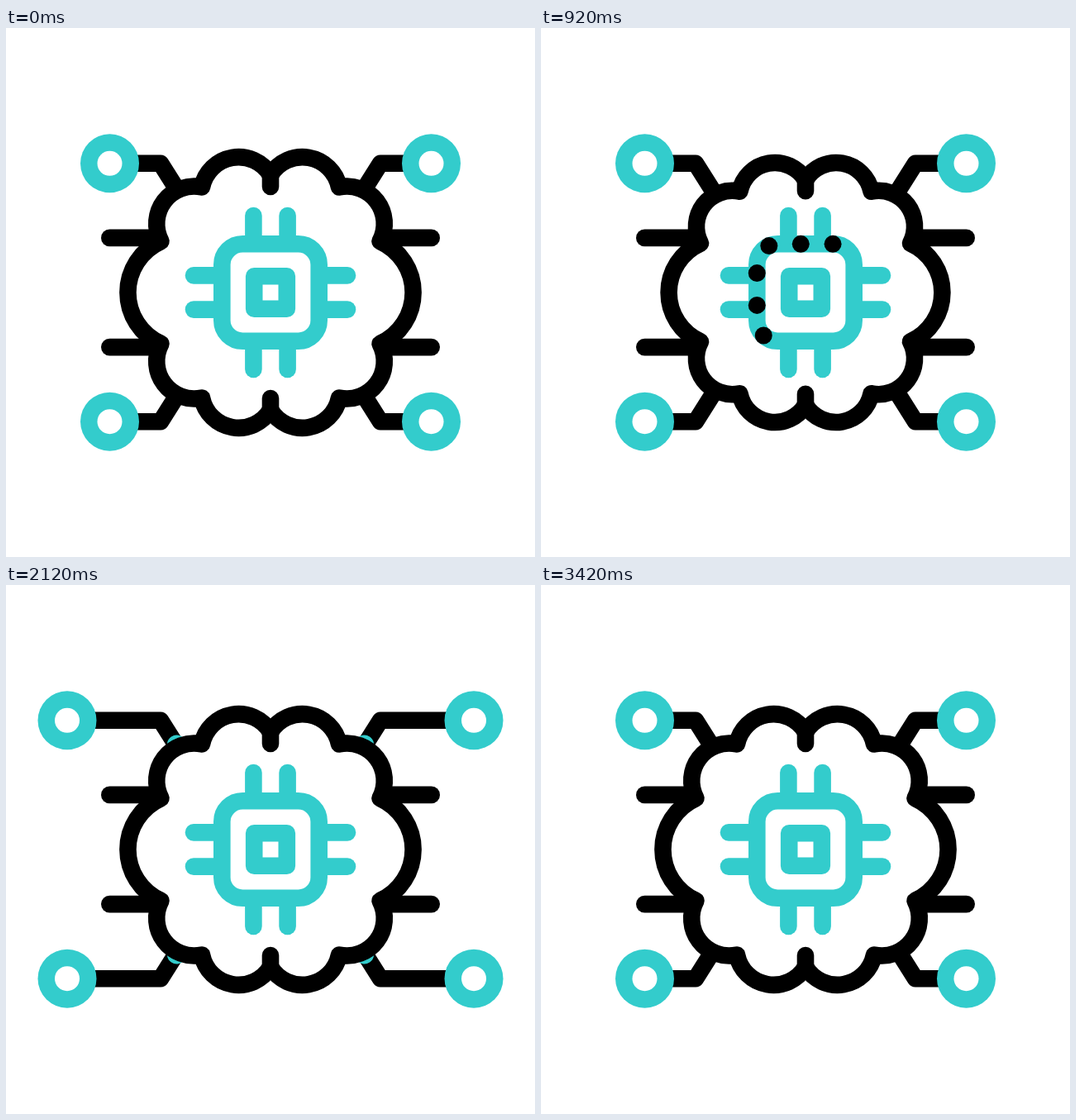
Animation, 640 px wide and 640 px high, one loop 3600 ms. Source, as an HTML page with a canvas:

```html
<!DOCTYPE html>
<html lang="en">
<head>
<meta charset="utf-8">
<title>Brain chip</title>
<style>
html, body { margin: 0; width: 100%; height: 100%; overflow: hidden; background: #fff; }
canvas { display: block; width: 640px; height: 640px; }
</style>
</head>
<body>
<canvas id="stage" width="640" height="640"></canvas>
<script>
const ctx = document.getElementById('stage').getContext('2d');
const LOOP = 3600, W = 20.6;
const BLACK = '#000', CYAN = '#33cccc', WHITE = '#fff';
const SIDES = [-1, 1];

// All coordinates are relative to the centre of the stage.
const brain = new Path2D(
  'M0 -142 A45.2 45.2 0 0 0 -83 -127.5 A45.3 45.3 0 0 0 -132.5 -62' +
  'A68 68 0 0 0 -132.5 62 A45.3 45.3 0 0 0 -83 127.5 A45.2 45.2 0 0 0 0 142' +
  'A45.2 45.2 0 0 0 83 127.5 A45.3 45.3 0 0 0 132.5 62' +
  'A68 68 0 0 0 132.5 -62 A45.3 45.3 0 0 0 83 -127.5 A45.2 45.2 0 0 0 0 -142Z');
const stems = new Path2D('M0 -142V-128M0 142V128');

// Eased progress from time a to time b.
function ease(t, a, b) {
  const u = Math.min(1, Math.max(0, (t - a) / (b - a)));
  return u * u * (3 - 2 * u);
}

function line(points, color, width = W) {
  ctx.beginPath();
  points.forEach(([x, y]) => ctx.lineTo(x, y));
  ctx.strokeStyle = color;
  ctx.lineWidth = width;
  ctx.stroke();
}

function disc(x, y, r, color) {
  ctx.beginPath();
  ctx.arc(x, y, r, 0, 2 * Math.PI);
  ctx.fillStyle = color;
  ctx.fill();
}

// Part of a polyline between two fractions of its length.
function trim(points, from, to) {
  const lens = points.slice(1).map((p, i) => Math.hypot(p[0] - points[i][0], p[1] - points[i][1]));
  const total = lens.reduce((a, b) => a + b);
  const out = [];
  let pos = 0;
  lens.forEach((len, i) => {
    const a = Math.max(0, (from * total - pos) / len);
    const b = Math.min(1, (to * total - pos) / len);
    if (a < b) {
      const [p, q] = [points[i], points[i + 1]];
      for (const u of [a, b]) out.push([p[0] + (q[0] - p[0]) * u, p[1] + (q[1] - p[1]) * u]);
    }
    pos += len;
  });
  return out;
}

const NODE_Y = 156.2, NODE_IN = 194.5, NODE_OUT = 246;

function drawWires(t) {
  const head = ease(t, 2100, 2450), tail = ease(t, 2300, 2650);
  for (const sx of SIDES) for (const sy of SIDES) {
    const back = sx === sy ? ease(t, 2600, 3000) : ease(t, 3000, 3405);
    const x = NODE_IN + (NODE_OUT - NODE_IN) * (ease(t, 1100, 1600) - back);
    const flip = points => points.map(([px, py]) => [px * sx, py * sy]);

    line(flip([[194.7, 66.1], [112, 66.1]]), BLACK);
    line(flip([[x, NODE_Y], [133, NODE_Y], [100, 104]]), BLACK);
    if (head > tail) {
      const route = flip([[113, 126], [133, NODE_Y], [206, NODE_Y]]);
      line(trim(route, tail, head), CYAN, 23);
    }
    disc(x * sx, NODE_Y * sy, 35.5, CYAN);
    disc(x * sx, NODE_Y * sy, 15, WHITE);
  }
}

function drawBrain(t) {
  const scale = 1 - 0.119 * (ease(t, 200, 650) - ease(t, 650, 1100));
  ctx.save();
  ctx.scale(scale, scale);
  ctx.lineWidth = W / scale;
  ctx.strokeStyle = BLACK;
  ctx.fillStyle = WHITE;
  ctx.fill(brain);
  ctx.stroke(brain);
  ctx.stroke(stems);
  ctx.restore();
}

const HALF = 58.7, CORNER = 25;
const FLAT = HALF - CORNER, ARC = CORNER * Math.PI / 2;
const QUARTER = 2 * FLAT + ARC, GIRTH = 4 * QUARTER;

// Point on the chip's outline, clockwise from the top centre.
function chipPoint(s) {
  const turns = Math.floor(s / QUARTER);
  const d = s - turns * QUARTER;
  let x, y;
  if (d < FLAT) [x, y] = [d, -HALF];
  else if (d < FLAT + ARC) {
    const a = (d - FLAT) / CORNER;
    [x, y] = [FLAT + CORNER * Math.sin(a), -FLAT - CORNER * Math.cos(a)];
  } else [x, y] = [HALF, d - QUARTER];
  for (let i = 0; i < turns % 4; i++) [x, y] = [-y, x];
  return [x, y];
}

function drawChip(t) {
  for (const a of SIDES) for (const b of SIDES) {
    line([[a * 20.6, b * 93], [a * 20.6, b * HALF]], CYAN);
    line([[b * 93, a * 20.6], [b * HALF, a * 20.6]], CYAN);
  }
  ctx.beginPath();
  ctx.roundRect(-HALF, -HALF, 2 * HALF, 2 * HALF, CORNER);
  ctx.fillStyle = WHITE;
  ctx.fill();
  ctx.stroke();
  ctx.strokeRect(-19.8, -19.8, 39.6, 39.6);

  const head = GIRTH * ease(t, 200, 1000), tail = GIRTH * ease(t, 590, 1250);
  if (head > tail) {
    for (let s = tail; s <= head; s += GIRTH / 11) disc(...chipPoint(s + 51.5), 10.5, BLACK);
  }
}

function draw() {
  const t = performance.now() % LOOP;
  ctx.setTransform(1, 0, 0, 1, 0, 0);
  ctx.fillStyle = WHITE;
  ctx.fillRect(0, 0, 640, 640);
  ctx.translate(320, 320);
  ctx.lineCap = ctx.lineJoin = 'round';
  drawWires(t);
  drawBrain(t);
  drawChip(t);
  requestAnimationFrame(draw);
}
draw();
</script>
</body>
</html>
```
